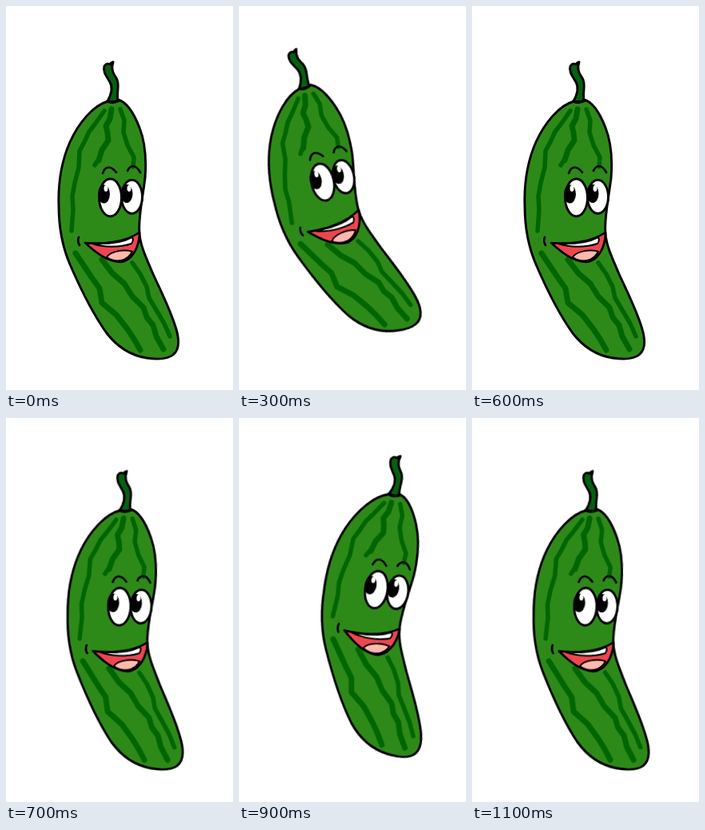
An HTML page for the animation above (1.2 s loop, 284 px wide and 480 px high).

```html
<!DOCTYPE html>
<html lang="en">
<head>
<meta charset="utf-8">
<title>Swaying cucumber</title>
<style>
  html, body { margin: 0; width: 100%; height: 100%; overflow: hidden; background: #fff; }
  svg { display: block; width: 100vw; height: 100vh; }
  path, ellipse { stroke-linecap: round; stroke-linejoin: round; }
  .ink { stroke: #000; stroke-width: 2.9; }
  .line { fill: none; stroke: #000; stroke-width: 2.7; }
  .stripe { fill: none; stroke: #006600; stroke-width: 7; }
  .thin { stroke-width: 5.5; }

  /* Twelve held poses: out to the left and back, then out to the right and back */
  #cucumber { transform-origin: 0 0; animation: sway 1200ms step-end infinite; }
  @keyframes sway {
    0%, 50%, 100%      { transform: translate(133px, 118px); }
    8.3333%, 41.6666%  { transform: translate(119px, 114.5px) rotate(-3.4deg); }
    16.6666%, 33.3333% { transform: translate(102.5px, 107.5px) rotate(-8.3deg); }
    25%                { transform: translate(81px, 101px) rotate(-12.4deg); }
    58.3333%, 91.6666% { transform: translate(148.5px, 114.5px) rotate(1.9deg); }
    66.6666%, 83.3333% { transform: translate(169px, 104px) rotate(5.5deg); }
    75%                { transform: translate(193.5px, 95px) rotate(9.1deg); }
  }
</style>
</head>
<body>
<svg viewBox="0 0 284 480">
  <g id="cucumber">
    <!-- Drawn upright; the stem base is the pivot -->
    <g transform="translate(-133 -118)">
      <path class="ink" fill="#2e8a18" d="M128 119C109 124 91 146 80 170C69 195 65 222 66 250C66 280 71 302 80 323C93 353 108 384 126 409C140 427 157 437 176 440C190 442 203 441 209 436C217 430 217 418 213 404C206 380 194 357 184 335C176 316 168 300 167 284C165 266 171 240 174 215C176 190 174 170 167 152C160 134 152 120 140 117Z"/>

      <path class="stripe thin" d="M123 131L111 148L104 157L98 170L92 181L91 202L86 221L83 238L84 255L82 281"/>
      <path class="stripe" d="M132 129L130 141L125 150L127 158L128 168L120 180L116 193"/>
      <path class="stripe thin" d="M116 191L111 199"/>
      <path class="stripe thin" d="M143 129L148 143L147 158L152 174L160 189L159 201"/>
      <path class="stripe" d="M87 309L107 339L117 353L120 371L138 386L152 404L160 416L168 430"/>
      <path class="stripe" d="M120 317L133 334L148 347L158 363L172 377L176 389L184 399L188 413L197 429"/>
      <path class="stripe thin" d="M158 321L168 335L176 351L179 365L188 380L198 397L205 413"/>

      <path class="ink" fill="#066010" d="M123 75Q126 71 130 73Q131 71 134 70C131 79 134 84 138 90C143 98 138 106 140 118Q134 121 127 119C132 110 134 102 130 95C125 87 121 82 123 75Z"/>
      <path class="line" d="M126 119Q134 123 142 118"/>

      <path class="line" d="M121 209C124 200 131 199 138 208M152 206C155 199 162 197 168 208"/>

      <g class="ink" fill="#fff">
        <ellipse cx="157.500" cy="238.500" rx="13" ry="21"/>
        <ellipse cx="130.500" cy="239.500" rx="14" ry="23.500"/>
      </g>
      <ellipse cx="122.500" cy="235" rx="7.500" ry="11.500"/>
      <ellipse cx="151" cy="234.500" rx="7.500" ry="11.500"/>
      <g fill="#fff">
        <ellipse cx="125" cy="228" rx="2.500" ry="4"/>
        <ellipse cx="154" cy="228" rx="2.500" ry="4"/>
      </g>

      <path fill="#ee4650" d="M99 296C120 298 148 296 167 283C167 302 157 320 142 320C126 319 112 308 99 296Z"/>
      <path class="line" style="fill:#ffb9ad;stroke-width:2" d="M126 314C131 306 148 304 158 307C152 319 138 322 126 314Z"/>
      <path class="line" style="fill:#fff;stroke-width:2" d="M108 297C128 298 145 296 158 289Q160 293 157 297C143 302 122 302 108 297Z"/>
      <path class="line" d="M99 296C120 298 148 296 167 283C167 302 157 320 142 320C126 319 112 308 99 296Z"/>
      <path class="line" d="M91 289Q89 294 92 299"/>
    </g>
  </g>
</svg>
</body>
</html>
```
